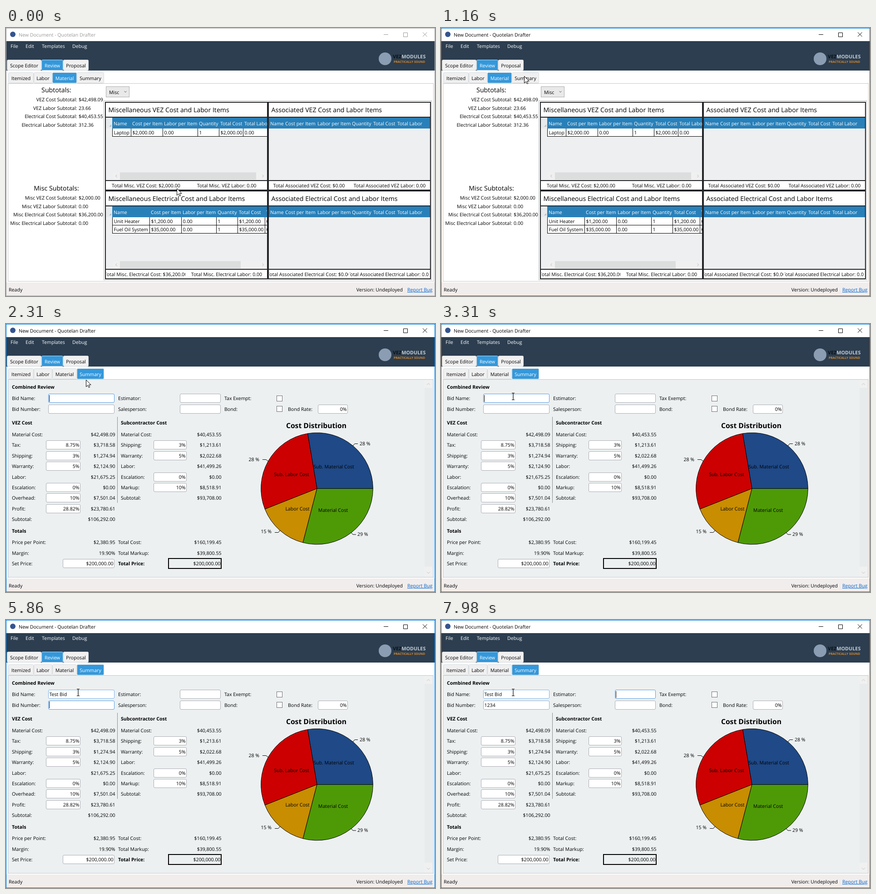
Write an HTML page that moves like this. It is 945 px wide and 592 px high and loops after 8 s.

```html
<!DOCTYPE html>
<html lang="en">
<head>
<meta charset="utf-8">
<title>Quotelan Drafter</title>
<style>
html, body { margin: 0; width: 100%; height: 100%; overflow: hidden; background: #fff; }
#stage { display: block; width: 945px; height: 592px; }
text { font: 10.6px "Open Sans", "Noto Sans", sans-serif; text-rendering: geometricPrecision; white-space: pre; }
.b { font-weight: bold; font-size: 10.6px; }
.h { font-size: 14.2px; }
</style>
</head>
<body>
<svg id="stage" viewBox="0 0 945 592"></svg>
<script>
const LOOP = 8000;
const DARK = '#2c3e50', BLUE = '#3498db', HEAD = '#2980b9', PALE = '#ecf0f1', GRAY = '#abadb3', INK = '#232427';
const FOCUS = '#569de5', HOVER = '#7eb4ea';

// Markup helpers
const text = (x, y, s, attrs = '') => `<text x="${x}" y="${y}" ${attrs}>${s}</text>`;
const right = (x, y, s) => text(x, y, s, 'text-anchor="end"');
const mid = (x, y, s, attrs = '') => text(x, y, s, 'text-anchor="middle" ' + attrs);
const rect = (x, y, w, h, fill, attrs = '') =>
  `<rect x="${x}" y="${y}" width="${w}" height="${h}" fill="${fill}" ${attrs}/>`;
const box = (x, y, w, h, fill, stroke, attrs = '') =>
  rect(x + .5, y + .5, w - 1, h - 1, fill, `stroke="${stroke}" ${attrs}`);
const path = (d, stroke, attrs = '') => `<path d="${d}" fill="none" stroke="${stroke}" ${attrs}/>`;
const clip = (x, y, w, h, body) =>
  `<svg x="${x}" y="${y}" width="${w}" height="${h}" viewBox="${x} ${y} ${w} ${h}">${body}</svg>`;
const field = (x, y, w, value = '', id = '') =>
  box(x, y, w, 20, '#fff', GRAY, `rx="2.5" ${id && `id="${id}"`}`) + right(x + w - 2.5, y + 14, value);
const tab = (x, y, w, label, selected) =>
  box(x, y, w, 24, selected ? BLUE : '#f0f0f0', '#d5dbdf', 'rx="2"') +
  mid(x + w / 2, y + 17, label, selected ? 'fill="#fff"' : '');

function frame() {
  const menu = [[10, 'File'], [43, 'Edit'], [79, 'Templates'], [146, 'Debug']];
  return rect(0, 0, 945, 592, '#fff') +
    '<circle cx="15" cy="14" r="6" fill="#34548f"/>' +
    text(28, 19, 'New Document - Quotelan Drafter', 'id="caption"') +
    path('M832 14.5h10M875.5 10.5h9v9h-9zM918 9.5l9.5 9.5m0-9.5l-9.5 9.5', '#000', 'id="buttons"') +
    rect(0, 29, 945, 65, DARK) + menu.map(([x, s]) => text(x, 44, s, 'fill="#fff"')).join('') +
    tab(2, 70, 76, 'Scope Editor') + tab(78, 70, 48, 'Review', true) + tab(126, 70, 56, 'Proposal') +
    '<circle cx="835" cy="68" r="14" fill="#8b9db2"/>' +
    text(852, 67, '<tspan fill="#0c1116">VEZ</tspan><tspan fill="#c3cbd4">MODULES</tspan>', 'style="font-size:10.8px;font-weight:bold"') +
    text(854, 77, 'PRACTICALLY SOUND', 'fill="#e58a22" style="font-size:6.6px;font-weight:bold"') +
    rect(0, 94, 945, 468, '#fff') + box(4, 122, 938, 438, '#fff', '#c4c7c9') +
    tab(5, 98, 56, 'Itemized') + tab(61, 98, 41, 'Labor') +
    rect(0, 562, 945, 30, '#f1eded') + text(6, 582, 'Ready') + right(874, 582, 'Version: Undeployed') +
    text(884, 582, 'Report Bug', 'fill="#0066cc" text-decoration="underline"');
}

const pageTabs = summary => tab(102, 98, 54, 'Material', !summary) + tab(156, 98, 60, 'Summary', summary);

const COLUMNS = ['Name', 'Cost per Item', 'Labor per Item', 'Quantity', 'Total Cost', 'Total Labor'];

function panel(x, y, title, starts, rows, thumb, totals) {
  let out = rect(x + 1, y + 1, 357, 194, '#fff', `stroke="${INK}" stroke-width="2"`) +
    text(x + 7.5, y + 23, title, 'class="h"') +
    rect(x + 2, y + 35, 355, 138, '#edeff0') + rect(x + 1, y + 33, 357, 2, INK) +
    rect(x + 2, y + 35, 355, 24, HEAD) + rect(x + 1, y + 173, 357, 2, INK);
  let table = COLUMNS.map((s, i) => text(starts[i], y + 52, s, 'fill="#fff"')).join('');
  if (thumb) {
    const c = y + 164;
    table += rect(220, y + 35, 14, 24, '#e7eaec') + `<path d="M227 ${y + 55}h5v-5z" fill="#b9bec2"/>` +
      rect(235, c - 8, 340, 17, '#f0f0f0') + rect(251, c - 8, thumb, 16, '#dcdddd') +
      path(`M244.5 ${c - 3}l-3 3 3 3M564.5 ${c - 3}l3 3-3 3`, '#b5b8ba');
  }
  rows.forEach((cells, r) => {
    const top = y + 59 + 18 * r;
    table += rect(220, top, 14, 18, '#f0f0f0') + rect(234, top, 341, 17, '#fff') + rect(234, top + 17, 341, 1, '#000');
    cells.forEach((s, i) => {
      table += rect(starts[i] - 3, top, 1, 18, '#000') + text(starts[i] + .5, top + 13, s);
    });
  });
  out += clip(x + 2, y + 35, 355, 138, table);
  totals.forEach(([cx, s], i) => {
    out += clip(x + (i ? 180 : 3), y + 175, 174, 18, mid(cx, y + 189, s));
  });
  return out;
}

function materialPage() {
  const sums = [
    ['VEZ Cost Subtotal:', '$42,498.09'], ['VEZ Labor Subtotal:', '23.66'],
    ['Electrical Cost Subtotal:', '$40,453.55'], ['Electrical Labor Subtotal:', '312.36']];
  const misc = [
    ['Misc VEZ Cost Subtotal:', '$2,000.00'], ['Misc VEZ Labor Subtotal:', '0.00'],
    ['Misc Electrical Cost Subtotal:', '$36,200.00'], ['Misc Electrical Labor Subtotal:', '0.00']];
  const list = (rows, y) => rows.map(([a, b], i) =>
    right(156.5, Math.round(y + 18.7 * i), a) + text(160, Math.round(y + 18.7 * i), b)).join('');
  const empty = [582, 615, 686, 762, 809, 862];
  return pageTabs(false) +
    mid(111, 142, 'Subtotals:', 'class="h"') + list(sums, 162) +
    mid(111, 359, 'Misc Subtotals:', 'class="h"') + list(misc, 379) +
    box(220, 129, 52, 24, '#e9e9e9', '#acacac') + text(227, 146, 'Misc') + path('M260.5 139.5l2.5 2.5 2.5-2.5', '#555') +
    box(215, 160, 723, 397, '#fff', '#b9bcbe') +
    panel(218, 163, 'Miscellaneous VEZ Cost and Labor Items', [237, 278, 348, 425, 472, 525],
      [['Laptop', '$2,000.00', '0.00', '1', '$2,000.00', '0.00']], 300,
      [[308.5, 'Total Misc. VEZ Cost: $2,000.00'], [486, 'Total Misc. VEZ Labor: 0.00']]) +
    panel(577, 163, 'Associated VEZ Cost and Labor Items', empty, [], 0,
      [[667.5, 'Total Associated VEZ Cost: $0.00'], [845, 'Total Associated VEZ Labor: 0.00']]) +
    panel(218, 359, 'Miscellaneous Electrical Cost and Labor Items', [237, 319, 389, 466, 513, 573],
      [['Unit Heater', '$1,200.00', '0.00', '1', '$1,200.00', '0.00'],
       ['Fuel Oil System', '$35,000.00', '0.00', '1', '$35,000.00', '0.00']], 266,
      [[308, 'Total Misc. Electrical Cost: $36,200.00'], [486, 'Total Misc. Electrical Labor: 0.00']]) +
    panel(577, 359, 'Associated Electrical Cost and Labor Items', empty, [], 0,
      [[667, 'Total Associated Electrical Cost: $0.00'], [845, 'Total Associated Electrical Labor: 0.00']]);
}

function pie() {
  const cx = 685, cy = 363.5, r = 123.3;
  const rim = deg => {
    const a = deg * Math.PI / 180;
    return `${cx + r * Math.cos(a)} ${cy - r * Math.sin(a)}`;
  };
  const slices = [[0, 99.6, '#1f4987'], [99.6, 201.6, '#cc0000'], [201.6, 255.5, '#c88d00'], [255.5, 360, '#4e9a06']];
  return mid(683.5, 230, 'Cost Distribution', 'class="b" style="font-size:15.7px"') +
    slices.map(([a, b, fill]) =>
      `<path d="M${cx} ${cy}L${rim(a)}A${r} ${r} 0 0 0 ${rim(b)}Z" fill="${fill}" stroke="#000"/>`).join('') +
    mid(722, 319, 'Sub. Material Cost') + mid(629, 336, 'Sub. Labor Cost') +
    mid(642, 412, 'Labor Cost') + mid(720.5, 414.5, 'Material Cost') +
    path('M764 269.5l4-5h7M578 303.5l-5-4h-8M604 455.5l-4 5h-8M760 460.5l4 4.5h7', '#000') +
    text(779, 268, '28 %') + right(558, 303, '28 %') + right(585, 462, '15 %') + text(774, 468, '29 %');
}

function summaryPage() {
  const own = [
    ['Material Cost:', '', '$42,498.09'], ['Tax:', '8.75%', '$3,718.58'], ['Shipping:', '3%', '$1,274.94'],
    ['Warranty:', '5%', '$2,124.90'], ['Labor:', '', '$21,675.25'], ['Escalation:', '0%', '$0.00'],
    ['Overhead:', '10%', '$7,501.04'], ['Profit:', '28.82%', '$23,780.61'], ['Subtotal:', '', '$106,292.00']];
  const sub = [
    ['Material Cost:', '', '$40,453.55'], ['Shipping:', '3%', '$1,213.61'], ['Warranty:', '5%', '$2,022.68'],
    ['Labor:', '', '$41,499.26'], ['Escalation:', '0%', '$0.00'], ['Markup:', '10%', '$8,518.91'],
    ['Subtotal:', '', '$93,708.00']];
  const sheet = (rows, x, fx, fw, end) => rows.map(([label, input, value], i) => {
    const y = Math.round(248 + 23.4 * i);
    return text(x, y, label) + (input && field(fx, y - 14, fw, input)) + right(end, y, value);
  }).join('');
  return pageTabs(true) +
    rect(5, 123, 936, 436, PALE) + rect(922, 124, 17, 434, '#e8ebec') +
    rect(922, 124, 17, 17, '#f0f0f0') + rect(922, 536, 17, 22, '#f0f0f0') +
    path('M927 134.5l3.5-3.5 3.5 3.5M927 547.5l3.5 3.5 3.5-3.5', '#bfc3c5') +
    text(13, 143, 'Combined Review', 'class="b"') +
    text(13, 168, 'Bid Name:') + field(93, 154, 146, '', 'name') +
    text(13, 192, 'Bid Number:') + field(93, 178, 146, '', 'number') +
    text(247, 168, 'Estimator:') + field(383, 154, 90, '', 'estimator') +
    text(247, 192, 'Salesperson:') + field(383, 178, 90) +
    text(481, 168, 'Tax Exempt:') + box(596, 158, 13, 13, '#fff', '#707070') +
    text(481, 192, 'Bond:') + box(596, 181, 13, 13, '#fff', '#707070') +
    text(621, 192, 'Bond Rate:') + field(687, 178, 66, '0%') +
    text(13, 222, 'VEZ Cost', 'class="b"') + text(253, 222, 'Subcontractor Cost', 'class="b"') +
    rect(245, 205, 1, 190, '#8a8d8f') +
    sheet(own, 13, 88, 76, 240.5) + sheet(sub, 253, 325, 73, 474.5) +
    text(13, 461, 'Totals', 'class="b"') +
    text(13, 486, 'Price per Point:') + right(240.5, 486, '$2,380.95') +
    text(247, 486, 'Total Cost:') + right(474.5, 486, '$160,199.45') +
    text(13, 510, 'Margin:') + right(240.5, 510, '19.90%') +
    text(247, 510, 'Total Markup:') + right(474.5, 510, '$39,800.55') +
    text(13, 533, 'Set Price:') + field(125, 519, 114, '$200,000.00') +
    text(247, 533, 'Total Price:', 'class="b" font-style="italic"') +
    rect(358, 518, 116, 22, PALE, 'stroke="#000" stroke-width="2"') + right(472.5, 533, '$200,000.00') +
    pie() + '<g id="typed"></g>' + rect(0, 0, 1, 15, '#000', 'id="caret"');
}

const stage = document.getElementById('stage');
stage.innerHTML = frame() + `<g id="material">${materialPage()}</g><g id="summary">${summaryPage()}</g>` +
  box(0, 0, 945, 592, 'none', '#0078d7', 'id="edge"') +
  '<g id="arrow"><path d="M.5.5v15.2l3.5-3.3 2.4 5 2.3-1.1-2.4-4.9h4.8z" fill="#fff" stroke="#000"/></g>' +
  '<g id="beam">' + path('M-3 -7.5h2.5l.5 .5 .5-.5h2.5M0 -7v13.5M-3 7.5h2.5l.5-.5 .5 .5h2.5', '#000', 'stroke-width="1.2"') + '</g>';

// Hard steps: each [time, value] holds until the next
function track(el, prop, steps) {
  const target = typeof el === 'string' ? document.getElementById(el) : el;
  const frames = steps.map(([t, v]) => ({ offset: t / LOOP, [prop]: v, easing: 'step-end' }));
  frames.push({ offset: 1, [prop]: steps[steps.length - 1][1] });
  target.animate(frames, { duration: LOOP, iterations: Infinity });
}
const at = (x, y) => `translate(${x}px, ${y}px)`;
const glide = (from, to, start, end, count) => Array.from({ length: count }, (_, i) => {
  const p = (i + 1) / count, e = (1 - Math.cos(Math.PI * p)) / 2;
  const [x, y] = from.map((v, k) => Math.round(v + (to[k] - v) * e));
  return [start + (end - start) * i / (count - 1), at(x, y)];
});

track('caption', 'fill', [[0, '#999'], [1160, '#000']]);
track('buttons', 'stroke', [[0, '#999'], [1160, '#000']]);
track('edge', 'stroke', [[0, '#a5a5a5'], [1160, '#0078d7']]);
track('material', 'opacity', [[0, 1], [1230, 0]]);
track('summary', 'opacity', [[0, 0], [1230, 1]]);

const toTab = glide([376, 354], [183, 106], 80, 850, 11);
const toField = glide([183, 106], [159, 160], 2150, 2690, 8);
for (const id of ['arrow', 'beam']) track(id, 'transform', [[0, at(376, 354)], ...toTab, ...toField]);
track('arrow', 'opacity', [[0, 1], [2535, 0]]);
track('beam', 'opacity', [[0, 0], [2535, 1], [4080, 0], [5790, 1]]);

track('name', 'stroke', [[0, FOCUS], [5790, HOVER]]);
track('number', 'stroke', [[0, GRAY], [5790, HOVER], [5860, FOCUS], [7980, '#8fb2d6']]);
track('estimator', 'stroke', [[0, GRAY], [7980, FOCUS]]);

// Typing: time of each key and the caret position after it
const nameKeys = [[4080, 100], [4230, 106], [4460, 111], [4540, 114], [4710, 117], [5090, 123], [5240, 126], [5390, 133]];
const numberKeys = [[6690, 101], [6910, 107], [7090, 113], [7370, 119]];

function type(word, keys, y) {
  keys.forEach(([t], i) => {
    const holder = document.createElementNS('http://www.w3.org/2000/svg', 'g');
    holder.innerHTML = text(95.5, y, word.slice(0, i + 1));
    document.getElementById('typed').append(holder);
    const steps = [[0, 0], [t, 1]];
    if (keys[i + 1]) steps.push([keys[i + 1][0], 0]);
    track(holder, 'opacity', steps);
  });
}
type('Test Bid', nameKeys, 168);
type('1234', numberKeys, 192);

const onRow = (keys, y) => keys.map(([t, x]) => [t, at(x, y)]);
track('caret', 'transform', [[0, at(95, 157)], ...onRow(nameKeys, 157), [5790, at(95, 180)],
  ...onRow(numberKeys, 180), [7980, at(385, 157)]]);
track('caret', 'opacity', [[0, 1], [1770, 0], [2300, 1], [2760, 0], [3310, 1], [3770, 0], [4080, 1], [6540, 0], [6690, 1]]);
</script>
</body>
</html>
```
